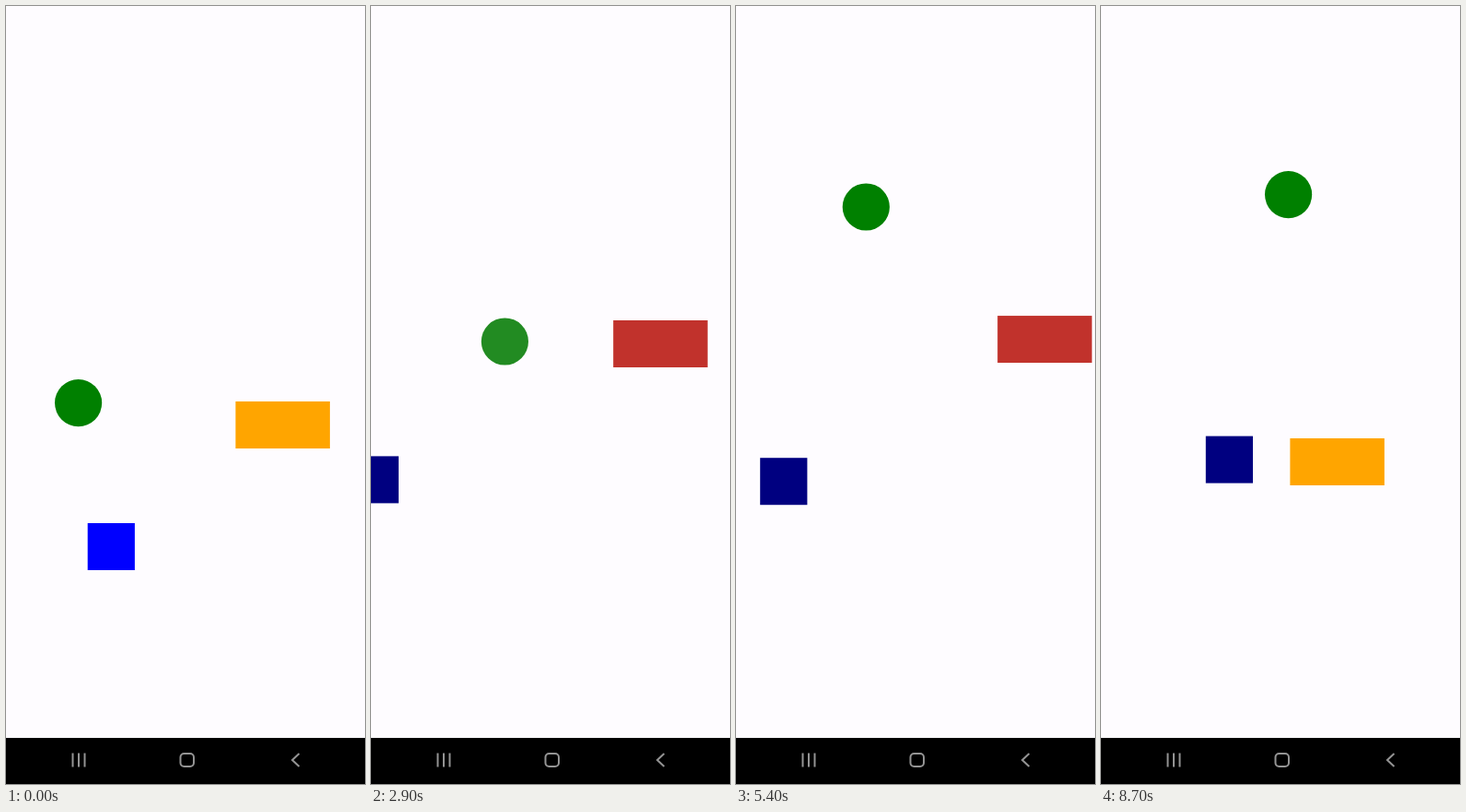
These frames come from a looping animation (390x844 px, 8.8 s). An HTML page:

```html
<!DOCTYPE html>
<html lang="en">
<head>
<meta charset="utf-8">
<title>Draggable shapes</title>
<style>
  html, body { margin: 0; width: 100%; height: 100%; overflow: hidden; background: #fefcff; }
  svg { display: block; width: 390px; height: 844px; }
</style>
</head>
<body>
<svg viewBox="0 0 390 844">
  <rect id="box" width="102.5" height="51"/>
  <rect id="square" width="51.2" height="51"/>
  <circle id="disc" cx="25.6" cy="25.6" r="25.6"/>
  <path d="M0 794H390V844H0z"/>
  <g fill="none" stroke="#949494" stroke-width="2">
    <path d="M72.5 810.5v15M79 810.5v15M85.5 810.5v15"/>
    <rect x="189.5" y="811" width="14.5" height="14" rx="4"/>
    <path d="M318.5 811l-7.5 7 7.5 7"/>
  </g>
</svg>
<script>
const LOOP = 8800, STEP = 100;

// Each stop is [time, left, top]. A shape rests between two equal stops and is
// dragged otherwise; sway is the sideways reach of a drag, growing over the loop.
const shapes = [
  {
    id: 'disc', idle: '#008000', pressed: '#228b22', sway: 0,
    stops: [
      [200, 53, 405], [1300, 33.7, 331], [2400, 95, 230], [2900, 119.8, 338.4],
      [4100, 115, 163], [4600, 115.7, 192.4], [7200, 115.7, 192.4],
      [7400, 143, 128.3], [8400, 178, 179]
    ]
  },
  {
    id: 'square', idle: '#0000ff', pressed: '#000080', sway: -60,
    stops: [
      [200, 88.7, 561], [1300, 68.8, 583.4], [2900, -21.2, 488.4], [4700, 60.7, 507.4],
      [6200, 65.4, 469.2], [7300, 108.6, 399.2], [7900, 108.6, 399.2], [LOOP, 135, 469]
    ]
  },
  {
    id: 'box', idle: '#ffa500', pressed: '#c1322c', sway: 60,
    stops: [
      [200, 249.4, 429], [1300, 232, 440.5], [2900, 263.2, 341], [4700, 226.3, 365.7],
      [5900, 262, 318.2], [6600, 262, 318.2], [7400, 188.5, 458.4], [8600, 205.4, 469]
    ]
  }
];

const ease = u => u * u * (3 - 2 * u);
const mix = (a, b, u) => a + (b - a) * u;

function poseAt({ stops, sway }, t) {
  const next = stops.findIndex(stop => stop[0] > t);
  const [t1, x1, y1] = stops.at(next);
  const [t0, x0, y0] = stops[next - 1] ?? [t1, x1, y1];
  const held = next > 0 && (x0 !== x1 || y0 !== y1);
  if (!held) return { x: x1, y: y1, held };
  const u = (t - t0) / (t1 - t0);
  const drift = sway * t / LOOP * Math.sin(Math.PI * u);
  return { x: mix(x0, x1, ease(u)) + drift, y: mix(y0, y1, ease(u)), held };
}

function draw(t) {
  for (const shape of shapes) {
    const { x, y, held } = poseAt(shape, t);
    const node = document.getElementById(shape.id);
    node.setAttribute('transform', `translate(${x} ${y})`);
    node.setAttribute('fill', held ? shape.pressed : shape.idle);
  }
}

const startTime = performance.now();
function tick() {
  const t = (performance.now() - startTime) % LOOP;
  draw(Math.floor(t / STEP) * STEP);
  requestAnimationFrame(tick);
}
tick();
</script>
</body>
</html>
```
